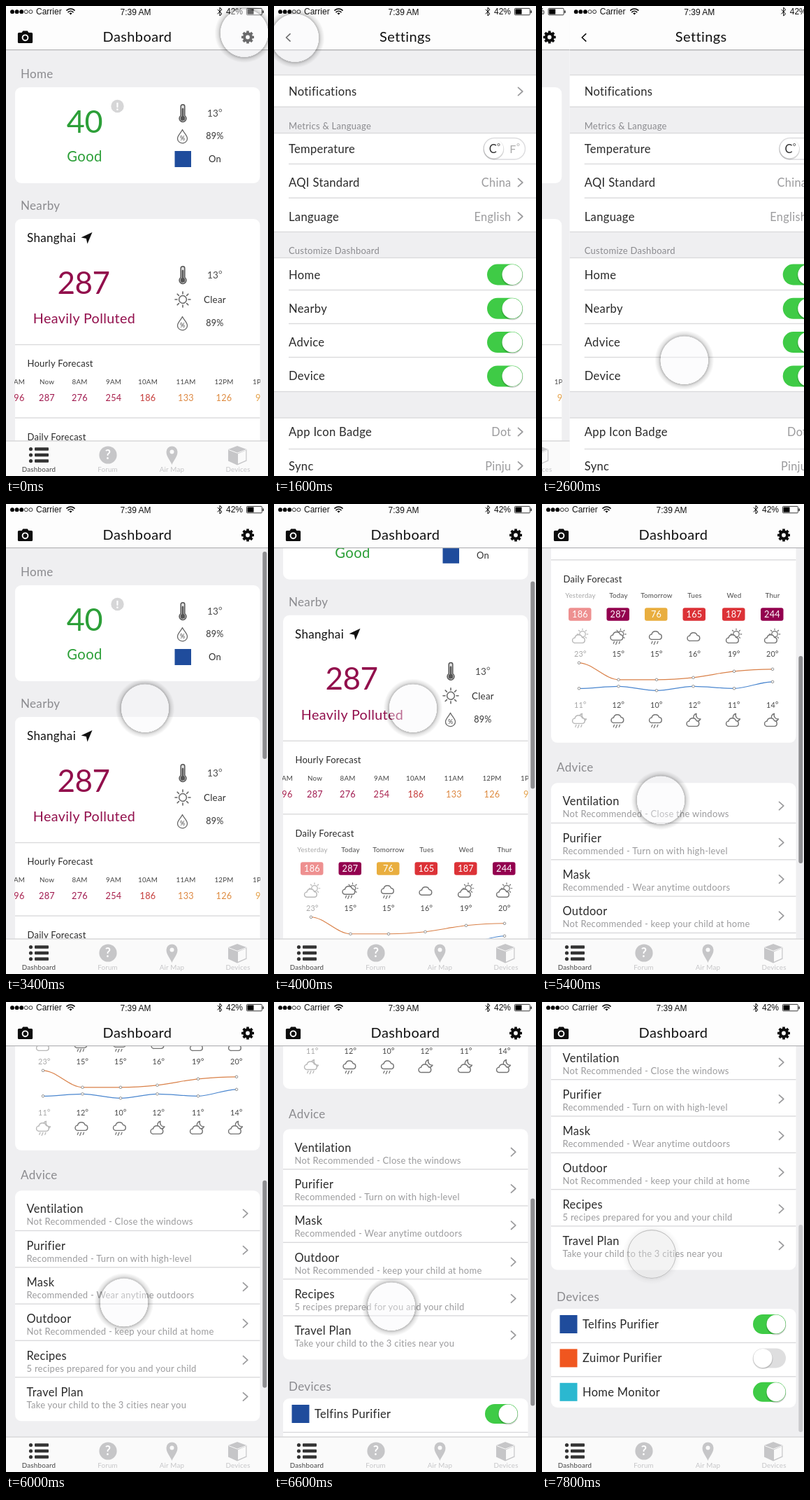
Recreate the animation shown at these times as an HTML page. Size 375 by 671 pixels, loop 8000 ms.

```html
<!DOCTYPE html>
<html lang="en">
<head>
<meta charset="utf-8">
<title>Air quality app</title>
<style>
html, body { margin: 0; width: 100%; height: 100%; overflow: hidden; background: #fff; }
svg { display: block; width: 100%; height: 100%; }
text { font-family: Lato, "Open Sans", sans-serif; letter-spacing: .02em; }
.sys { font-family: "Liberation Sans", Arial, sans-serif; letter-spacing: 0; }
.tight { letter-spacing: -.01em; }
</style>
</head>
<body>
<svg id="stage" viewBox="0 0 375 671" preserveAspectRatio="none"></svg>
<script>
const INK = '#2a2a2a', GREY = '#9b9b9d', LABEL = '#8b8b8f', PAGE = '#efeff1', LINE = '#dadadc';
const WINE = '#920f4c', GREEN = '#2c9f38', ICON = '#747474';

// Drawing helpers, each returns markup
const text = (x, y, s, size, fill = INK, anchor = 'start', weight = 400, cls = '') =>
  `<text x="${x}" y="${y}" font-size="${size}" fill="${fill}" text-anchor="${anchor}" font-weight="${weight}" class="${cls}">${s}</text>`;
const mid = (x, y, s, size, fill, weight, cls) => text(x, y, s, size, fill, 'middle', weight, cls);
const rect = (x, y, w, h, fill, r = 0, more = '') =>
  `<rect x="${x}" y="${y}" width="${w}" height="${h}" rx="${r}" fill="${fill}" ${more}/>`;
const circle = (x, y, r, fill, more = '') => `<circle cx="${x}" cy="${y}" r="${r}" fill="${fill}" ${more}/>`;
const path = (d, stroke, width = 1.4, fill = 'none') =>
  `<path d="${d}" stroke="${stroke}" stroke-width="${width}" fill="${fill}" stroke-linecap="round" stroke-linejoin="round"/>`;
const shape = (d, fill) => `<path d="${d}" fill="${fill}"/>`;
const move = (x, y, s, scale = 1) => `<g transform="translate(${x} ${y}) scale(${scale})">${s}</g>`;
const rule = (y, x = 13, end = 363.5) => rect(x, y - .7, end - x, 1.4, LINE);
const chevron = (x, y) => path(`M${x} ${y - 5.7}l6.3 5.7l-6.3 5.7`, GREY, 1.7);
const card = (y, end) => rect(13, y, 350.5, end - y, '#fff', 9);
const knob = (x, y, r) => circle(x, y + 1.2, r + .9, '#000', 'opacity=".16"') + circle(x, y, r, '#fff');
const toggle = (x, y, w, h, on) =>
  rect(x, y - h / 2, w, h, on ? '#3fcb46' : '#dededf', h / 2) +
  knob(on ? x + w - h / 2 : x + h / 2, y, h / 2 - .5);
const degrees = (x, y, n, size, fill = '#4a4a4a') =>
  mid(x, y, n, size, fill) +
  circle(x + size * .8, y - size * .66, size * .14, 'none', `stroke="${fill}" stroke-width=".8"`);
const rays = (n, a, b) => Array.from({ length: n }, (_, i) => {
  const c = Math.cos(i * 2 * Math.PI / n), s = Math.sin(i * 2 * Math.PI / n);
  return `M${a * c} ${a * s}L${b * c} ${b * s}`;
}).join('');

const thermometer = (x, y) => move(x, y,
  path('M-2.8 3.5V-9.5a2.8 2.8 0 0 1 5.6 0V3.5a4.9 4.9 0 1 1-5.600 0Z', '#555', 1.5, '#ddd') +
  circle(0, 7.4, 3.4, '#555') + path('M0 6V-6', '#555', 2.6));
const drop = (x, y) => move(x, y,
  path('M0-9.5C2-5 7-1 7 3.2a7 6.6 0 0 1-14 0C-7-1-2-5 0-9.5Z', '#666', 1.3) +
  mid(.1, 6.3, '%', 9, '#444'));
const sun = (x, y) => move(x, y, circle(0, 0, 5.4, 'none', 'stroke="#666" stroke-width="1.5"') + path(rays(8, 8, 11), '#666', 1.6));

// Forecast icons: c cloud, s sun, m moon, r rain
function weather(x, y, kind, color) {
  const has = k => kind.includes(k);
  const rain = has('r'), sky = has('s') || has('m');
  let s = '';
  if (has('s')) s += move(4, -4, path(rays(8, 6, 7.8), color, 1.2) + circle(0, 0, 4.2, '#fff', `stroke="${color}" stroke-width="1.3"`));
  if (has('m')) s += path('M3.500-9.500a5.400 5.400 0 1 0 6 7.600A5.600 5.600 0 0 1 3.500-9.500Z', color, 1.4, '#fff');
  s += move(sky ? -1 : 0, sky ? (rain ? 0 : 4) : (rain ? -1 : 1),
    path('M-6 5A4 4 0 0 1-6.5-3A6 6 0 0 1 5-3.5A4.3 4.3 0 0 1 5.5 5Z', color, 1.6, '#fff'), .92);
  if (rain) s += path('M-5 6.500l-1.200 3M-1 6.500l-1.800 4.200M3 6.500l-1.200 3', color, 1.3);
  return move(x, y, s);
}

function statusBar() {
  const dots = [9, 15.6, 22.2, 28.8, 35.4].map((x, i) =>
    circle(x, 8.2, i < 3 ? 2.9 : 2.5, i < 3 ? '#000' : 'none', i < 3 ? '' : 'stroke="#000" stroke-width=".8"')).join('');
  return dots + text(43, 12.3, 'Carrier', 12, '#111', 'start', 400, 'sys') +
    path('M87 6.2a8 8 0 0 1 11 0M89 8.7a5 5 0 0 1 7 0', '#000', 1.6) + shape('M90.5 10.4a3 3 0 0 1 4 0l-2 2.2Z', '#000') +
    text(185.5, 12.8, '7:39 AM', 12, '#111', 'middle', 400, 'sys') +
    path('M303 5.2l6 6l-3 2.8V2.2l3 2.9l-6 6', '#000', 1) +
    text(315, 12.3, '42%', 12, '#111', 'start', 400, 'sys') +
    rect(344.4, 3.4, 22, 9.4, '#fff', 1.2, 'stroke="#222" stroke-width=".9"') +
    rect(345.5, 4.5, 9, 7.2, '#000') + rect(367.4, 6.2, 1.5, 4, '#222', .7);
}
const navBar = title => rect(0, 0, 375, 62.5, '#fdfdfd') + rect(0, 62, 375, 1.2, '#b4b4b6') +
  statusBar() + mid(188, 51, title, 20, '#111');

const camera = shape('M18.5 38h4l1.8-2.6h6.4l1.8 2.6h4a1.6 1.6 0 0 1 1.6 1.6V51.4a1.6 1.6 0 0 1-1.6 1.6h-18a1.6 1.6 0 0 1-1.6-1.6V39.6a1.6 1.6 0 0 1 1.6-1.6Z', '#0c0c0c') +
  circle(27.5, 45.3, 3.9, 'none', 'stroke="#fff" stroke-width="1.9"');
const gear = move(346, 44.5, circle(0, 0, 4.9, 'none', 'stroke="#0c0c0c" stroke-width="4"') +
  `<path d="${rays(8, 6, 9)}" stroke="#0c0c0c" stroke-width="3.7"/>`);

function tabBar() {
  const off = '#c6c6c8';
  let s = rect(0, 620.5, 375, 51, '#fafafa') + rect(0, 620.5, 375, 1, '#c9c9cb');
  for (const y of [632.5, 641, 649.5]) s += circle(35.5, y, 2.6, '#333') + rect(41, y - 2.2, 20, 4.4, '#333', 1);
  s += circle(146, 641, 12.6, off) + mid(146, 647.3, '?', 18, '#fff', 700);
  s += shape('M237.5 655c-2-6-8-11-8-18.500a8 8 0 0 1 16 0c0 7.500-6 12.500-8 18.500Z', off) + circle(237.5, 636.5, 3, '#fafafa');
  s += shape('M331 628l13.500 5v16.500l-13.500 6l-13-6V633Z', off) + shape('M332 639.200l11.300-4.600v14l-11.300 5Z', '#fafafa') +
    path('M319 633.600l12 4.600l12.500-4.600', '#fafafa', 1);
  [['Dashboard', 47, '#444'], ['Forum', 145.5, off], ['Air Map', 237.5, off], ['Devices', 332, off]]
    .forEach(([n, x, c]) => s += mid(x, 665, n, 9.8, c));
  return s;
}

function home() {
  return text(21, 103, 'Home', 17, LABEL) + card(116, 253) +
    mid(112.5, 181, '40', 45, GREEN, 400, 'tight') + mid(112.5, 222, 'Good', 20.3, GREEN) +
    circle(159.5, 143, 9.2, '#d6d6d7') + mid(159.7, 148.6, '!', 15, '#fff', 900) +
    thermometer(253, 153) + degrees(296, 158, 13, 13.5) +
    drop(252.5, 186) + mid(299, 190, '89%', 12.5, '#333') +
    rect(241.5, 207, 23.5, 23, '#1f4c9c') + mid(299, 223, 'On', 13, '#333');
}

function nearby() {
  let s = text(21, 291, 'Nearby', 17, LABEL) + card(304, 849) +
    text(30, 337, 'Shanghai', 17, '#111') + shape('M123.5 323L107.5 330.5L114.8 332L116.5 339.5Z', '#111') +
    mid(111, 410.5, '287', 44, WINE, 400, 'tight') + mid(112, 453, 'Heavily Polluted', 19.7, WINE) +
    thermometer(253, 384) + degrees(296, 389, 13, 13.5) +
    sun(253, 419) + mid(299, 424, 'Clear', 13.4, '#333') +
    drop(252.5, 453) + mid(299, 457, '89%', 12.5, '#333') +
    rule(483.5) + text(30.5, 515, 'Hourly Forecast', 13) + rule(588);

  let strip = text(27, 540, '6AM', 9.8, '#444', 'end') + text(26.5, 564, '296', 12.7, '#a8224f', 'end') +
    text(353, 540, '1PM', 9.8, '#444') + text(357, 564, '98', 12.7, '#e5a34c');
  [[58.5, 'Now', 287, '#a01a50'], [105.5, '8AM', 276, '#a01a50'], [154, '9AM', 254, '#a8204c'], [203, '10AM', 186, '#c53c3a'],
   [257.5, '11AM', 133, '#dd8740'], [312, '12PM', 126, '#de8b40']]
    .forEach(([x, hour, n, c]) => strip += mid(x, 540, hour, 9.8, '#444') + mid(x, 564, n, 12.7, c));
  s += `<g clip-path="url(#strip)">${strip}</g>` + text(30.5, 620, 'Daily Forecast', 13);

  const days = [
    ['Yesterday', 55, 186, '#ee9090', 'cs', 23, 735, 11, 771.5, 'cmr'],
    ['Today', 109.5, 287, '#93004f', 'csr', 15, 759, 12, 768.5, 'cr'],
    ['Tomorrow', 164, 76, '#e9ae3f', 'cr', 15, 759, 10, 774.5, 'cr'],
    ['Tues', 218.5, 165, '#dc3237', 'c', 16, 756, 12, 768.5, 'cm'],
    ['Wed', 275, 187, '#dc3237', 'cs', 19, 747, 11, 771.5, 'cm'],
    ['Thur', 330, 244, '#93004f', 'cs', 20, 744, 14, 762, 'cm']];
  const dotX = i => days[i][1] - (i && i !== 3 ? 0 : 2);
  s += curve(days.map((d, i) => [dotX(i), d[6]]), '#d98048') + curve(days.map((d, i) => [dotX(i), d[8]]), '#4a86cf');
  days.forEach(([name, x, aqi, fill, day, high, , low, , night], i) => {
    const ink = i ? '#4a4a4a' : '#a8a8a8', line = i ? ICON : '#b9b9b9';
    s += mid(x, 642, name, 9.8, ink) + rect(x - 17, 656.5, 32.5, 18.5, fill, 3) + mid(x - .5, 670.3, aqi, 12.7, '#fff') +
      weather(x - 1, 698, day, line) + degrees(x - 2.5, 726.5, high, 10.8, ink) +
      degrees(x - 2.5, 799, low, 10.8, ink) + weather(x - 1, 817, night, line);
  });
  return s;
}

// Smooth line that stays level at its peaks, with a ring on every point
function curve(pts, color) {
  const slope = i => {
    if (!i || i === pts.length - 1) return 0;
    const [a, b] = [i - 1, i].map(k => (pts[k + 1][1] - pts[k][1]) / (pts[k + 1][0] - pts[k][0]));
    return a * b > 0 ? (a + b) / 2 : 0;
  };
  const d = pts.map(([x, y], i) => {
    if (!i) return `M${x} ${y}`;
    const [px, py] = pts[i - 1], h = (x - px) / 3;
    return `C${px + h} ${py + h * slope(i - 1)} ${x - h} ${y - h * slope(i)} ${x} ${y}`;
  }).join('');
  return path(d, color, 1.2) + pts.map(([x, y]) => circle(x, y, 1.8, '#fff', 'stroke="#888" stroke-width=".9"')).join('');
}

function advice() {
  let s = text(21, 890.5, 'Advice', 17, LABEL) + card(906.5, 1235.5);
  [['Ventilation', 'Not Recommended - Close the windows'], ['Purifier', 'Recommended - Turn on with high-level'],
   ['Mask', 'Recommended - Wear anytime outdoors'], ['Outdoor', 'Not Recommended - keep your child at home'],
   ['Recipes', '5 recipes prepared for you and your child'], ['Travel Plan', 'Take your child to the 3 cities near you']]
    .forEach(([name, note], i) => {
      const y = 938.7 + 52.3 * i;
      s += text(29.5, y, name, 16.4) + text(29.5, y + 17, note, 13, GREY) + chevron(339.5, y + .5);
      if (i < 5) s += rule(y + 25);
    });
  return s;
}

function devices() {
  let s = text(21, 1279.5, 'Devices', 17, LABEL) + card(1291, 1432);
  [['Telfins Purifier', '#1f4c9c', 1], ['Zuimor Purifier', '#f0561f', 0], ['Home Monitor', '#2bb8d0', 1]]
    .forEach(([name, color, on], i) => {
      const y = 1313 + 48.4 * i;
      s += rect(25.5, y - 13, 25, 26, color) + text(58, y + 6, name, 16.5) + toggle(302, y, 47, 28, on);
      if (i) s += rule(y - 22);
    });
  return s;
}

function settings() {
  let s = rect(0, 0, 375, 671, '#fff');
  for (const [y, end] of [[63, 98.5], [144, 181.5], [322.5, 359.5], [550.5, 588]])
    s += rect(0, y, 375, end - y, PAGE) + rule(y, 0, 375) + rule(end, 0, 375);
  for (const y of [225.5, 274, 405.5, 453.5, 501.5, 632.5]) s += rule(y, 21, 375);
  s += text(21, 176, 'Metrics &amp; Language', 13, LABEL) + text(21, 354, 'Customize Dashboard', 13, LABEL);
  [['Notifications', 122, ''], ['AQI Standard', 252, 'China'], ['Language', 300.5, 'English'],
   ['App Icon Badge', 608, 'Dot'], ['Sync', 656.5, 'Pinju']]
    .forEach(([name, y, value]) =>
      s += text(21, y + 6, name, 16.6) + text(339.5, y + 6, value, 16.3, GREY, 'end') + chevron(349.5, y));
  ['Home', 'Nearby', 'Advice', 'Device'].forEach((name, i) => {
    const y = 383.5 + 48.3 * i;
    s += text(21, y + 6, name, 16.6) + toggle(305, y, 51, 30, 1);
  });
  s += text(21, 209.5, 'Temperature', 16.5) +
    rect(300, 188.5, 59.5, 30.5, '#fff', 15.2, 'stroke="#dcdcde" stroke-width="1.4"') + knob(314.5, 203.5, 13.8) +
    mid(313.5, 209.5, 'C', 16.5, '#333') + circle(321.5, 198, 1.6, 'none', 'stroke="#444" stroke-width=".8"') +
    mid(342, 209.5, 'F', 16, '#aaa') + circle(349.5, 198, 1.6, 'none', 'stroke="#aaa" stroke-width=".8"');
  return s + navBar('Settings') + path('M23 39.8l-5.5 5.2l5.5 5.2', '#111', 1.7);
}

const stage = document.getElementById('stage');
stage.innerHTML = `<defs>
  <clipPath id="view"><rect y="63" width="375" height="557.5"/></clipPath>
  <clipPath id="strip"><rect x="12" y="525" width="352" height="50"/></clipPath>
  <radialGradient id="shade">
    <stop offset=".8" stop-color="#000" stop-opacity="0"/>
    <stop offset=".81" stop-color="#000" stop-opacity=".26"/>
    <stop offset=".88" stop-color="#000" stop-opacity=".11"/>
    <stop offset="1" stop-color="#000" stop-opacity="0"/>
  </radialGradient></defs>
  <g id="dash">${rect(0, 0, 375, 671, PAGE)}
    <g clip-path="url(#view)"><g id="list">${home() + nearby() + advice() + devices()}</g></g>
    ${rect(367.3, 68, 6, 296, '#8d8d90', 3, 'id="bar"')}${navBar('Dashboard') + camera + gear + tabBar()}</g>
  <g id="prefs">${settings()}</g>
  <g id="touch">${circle(0, .8, 42.5, 'url(#shade)', 'id="glow"') + circle(0, 0, 34.4, '#f8f8f9', 'id="pad" stroke="#777" fill-opacity=".4"')}</g>`;
const [dash, list, bar, prefs, touch, glow, pad] =
  ['dash', 'list', 'bar', 'prefs', 'touch', 'glow', 'pad'].map(id => document.getElementById(id));

const linear = u => u, smooth = u => u * u * (3 - 2 * u);
// Value at time t along [time, value] keys
function track(keys, t, ease = smooth) {
  if (t <= keys[0][0]) return keys[0][1];
  const i = keys.findIndex(k => k[0] > t);
  if (i < 0) return keys[keys.length - 1][1];
  const [t0, a] = keys[i - 1], [t1, b] = keys[i];
  return a + (b - a) * ease((t - t0) / (t1 - t0));
}

const LOOP = 8000;
const SLIDE = [[400, 0], [950, 1], [2500, 1], [3000, 0]];
const SCROLL = [[3500, 0], [3700, 40], [4000, 145], [5400, 508], [6200, 680], [6600, 725], [6850, 725], [7100, 768], [7500, 838], [7800, 853]];
const BAR = [[3150, 0], [3350, 1], [7500, 1], [7950, .15]];
const TOUCH_X = [[1150, 341], [1580, 30], [1750, 30], [2350, 205], [3200, 199], [4300, 199], [5350, 170], [6600, 168], [6900, 168], [7650, 157]];
const TOUCH_Y = [[1150, 38], [1580, 45], [1750, 45], [2350, 562], [3200, 291], [4300, 291], [5350, 422], [6600, 434], [6900, 434], [7650, 360]];

function draw(t) {
  const slide = track(SLIDE, t), scroll = track(SCROLL, t, linear);
  const fade = track([[7400, 0], [7800, 1]], t);
  dash.setAttribute('transform', `translate(${-375 * slide} 0)`);
  prefs.setAttribute('transform', `translate(${375 * (1 - slide)} 0)`);
  list.setAttribute('transform', `translate(0 ${-scroll})`);
  bar.setAttribute('transform', `translate(0 ${scroll * .293})`);
  bar.setAttribute('opacity', track(BAR, t));
  touch.setAttribute('transform', `translate(${track(TOUCH_X, t)} ${track(TOUCH_Y, t)})`);
  glow.setAttribute('opacity', 1 - .75 * fade);
  pad.setAttribute('fill', `rgb(${[248, 248, 249].map(v => v - 24 * fade)})`);
  pad.setAttribute('stroke-opacity', .04 + .36 * fade);
}

const start = performance.now();
function frame() {
  draw((performance.now() - start) % LOOP);
  requestAnimationFrame(frame);
}
frame();
</script>
</body>
</html>
```
